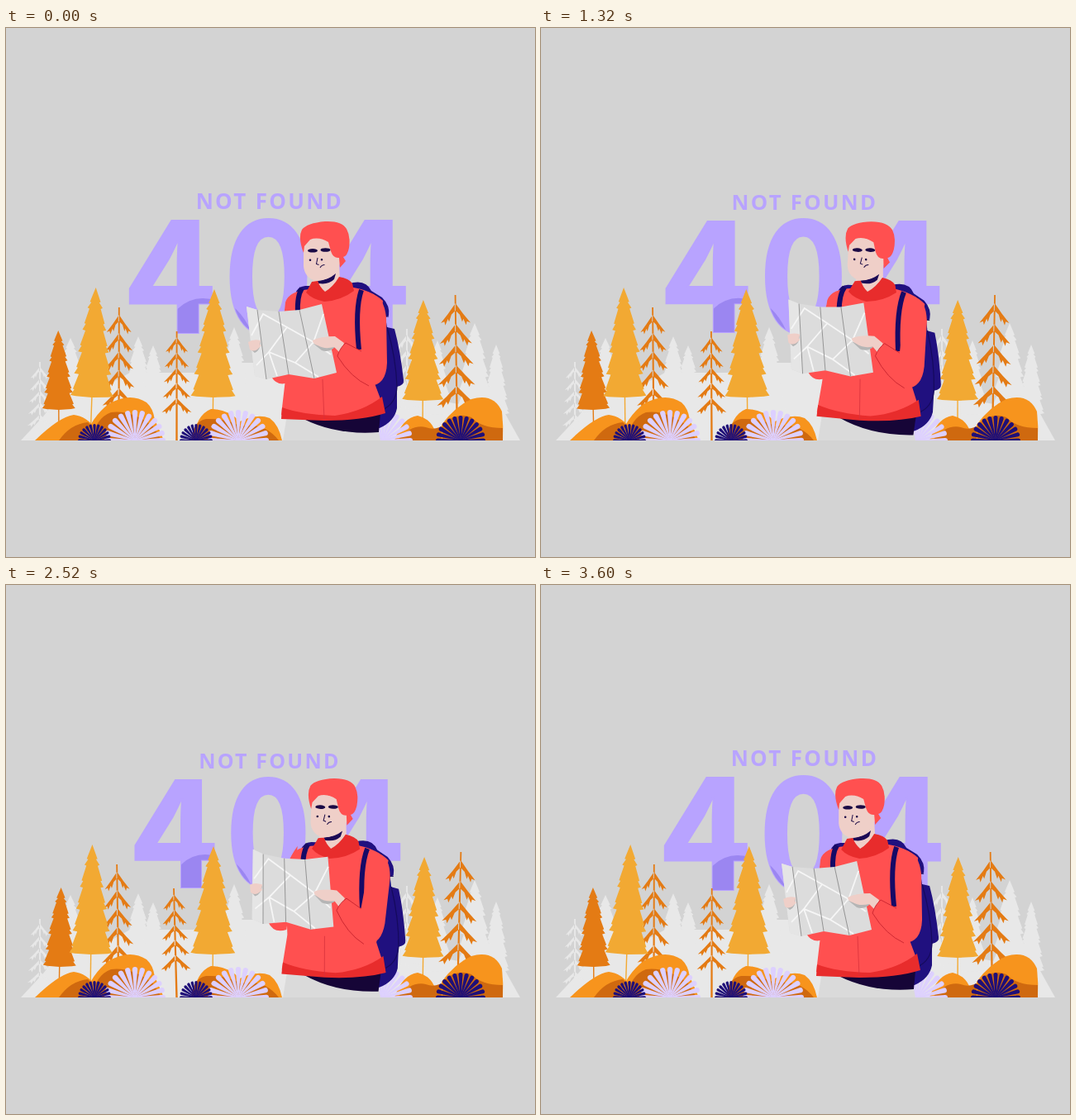
An HTML page that plays this animation: 640x640 px, repeating every 3630 ms.

```html
<!DOCTYPE html>
<html lang="en">
<head>
<meta charset="utf-8">
<title>Not found</title>
<style>
  html, body { margin: 0; width: 100%; height: 100%; overflow: hidden; background: #d3d3d3; }
  svg { display: block; width: 100vw; height: 100vh; }
  text { font-family: "Open Sans", "Noto Sans", sans-serif; font-weight: 700; }
  .digits { font-family: "Noto Sans CJK JP", "Noto Sans CJK SC", "Noto Sans CJK", "Open Sans", sans-serif; font-size: 183px; text-anchor: middle; }
</style>
</head>
<body>
<svg viewBox="0 0 640 640">
  <defs>
    <clipPath id="digits"><text class="digits" x="200 317.5 434" y="369">404</text></clipPath>
  </defs>

  <g id="title" fill="#b8a3ff">
    <text x="229.7" y="219" font-size="26" letter-spacing="2.3">NOT FOUND</text>
    <text class="digits" x="200 317.5 434" y="369" stroke="#b8a3ff" stroke-width="2">404</text>
    <g clip-path="url(#digits)" fill="#9b86f1">
      <circle cx="238" cy="369" r="42"/>
      <path d="M262 330Q286 339 300 375H262Z"/>
    </g>
  </g>

  <g id="backdrop" fill="#e8e8e8">
    <path d="M18 499L45 470L62 448Q105 440 130 428L150 417H260L285 405H340V430H480L520 450L603 465L622 499Z"/>
  </g>
  <g id="trees"></g>

  <g id="hills" fill="#f7941d">
    <path d="M35 499Q65 470 82 468Q98 470 108 485L125 499Z"/>
    <path fill="#cf690f" d="M64 499Q78 479 99 477L122 499Z"/>
    <path d="M94 499Q104 470 124 455Q150 440 170 453Q178 460 180 474L191 499Z"/>
    <path fill="#cf690f" d="M104 499Q108 472 127 465Q152 462 178 482L188 499Z"/>
    <path d="M226 499Q230 468 248 461Q268 461 283 476Q304 466 319 472Q330 480 334 499Z"/>
    <path fill="#cf690f" d="M224 499Q226 476 242 473Q268 472 283 482Q312 476 330 499Z"/>
    <path d="M470 499Q480 471 498 469Q512 472 518 485L540 499Z"/>
    <path fill="#cf690f" d="M474 499Q490 479 508 483Q520 488 533 478L560 499Z"/>
    <path d="M527 480Q543 458 563 449Q590 441 600 464Q602 482 601 499H527Z"/>
    <path fill="#cf690f" d="M528 480Q545 464 563 471Q575 484 601 484V499H528Z"/>
  </g>
  <g id="bushes"></g>

  <path fill="#dadada" d="M340 468L335 499H453L449 478Z"/>
  <g id="body">
    <path fill="#20107f" d="M350 322Q352 313 362 312H405L420 308Q436 305 442 318L455 326Q465 336 463 348L459 350L461 362L470 364Q477 390 481 426Q482 432 473 434V460Q470 476 452 484L360 470Z"/>
    <path fill="none" stroke="#150a5c" stroke-width="1.2" d="M446 322Q456 333 456 349H463M461 362Q472 400 473 434Q472 455 455 462"/>
    <path fill="#160537" d="M360 473Q400 493 451 489L453 466Z"/>
    <path fill="#ff5050" d="M368 316Q342 318 338 332L333 380Q336 400 338 425L333 468Q380 478 420 472Q440 468 458 462L446 430L456 330Q442 317 415 313Z"/>
    <path fill="#e82c2c" d="M334 459Q358 468 398 469Q432 464 455 446L459 466Q430 475 385 475L333 473Z"/>
    <path fill="none" stroke="#d8323c" stroke-width=".8" d="M383 425L385 474"/>
    <path fill="none" stroke="#160a66" stroke-width="6" d="M358 315Q352 324 353 345M430 317Q422 340 427 389"/>

    <path fill="#efcfc8" d="M376 285H403L404 304Q396 314 386 322L371 307Z"/>
    <path fill="#1b0a55" d="M377 306Q390 305 399 297L397 304Q390 311 378 309Z"/>
    <path fill="#e82c2c" d="M363 320L370 307L377 306Q380 314 386 319Q396 313 403 301Q415 303 419 309L421 318Q405 330 385 331Q370 328 363 320Z"/>
    <path fill="#efcfc8" d="M360 258V288Q361 302 375 306Q391 305 398 296L408 278L405 250H370Z"/>
    <path fill="#ff5050" d="M360 272Q353 254 358 244Q364 236 386 234Q406 233 412 243Q417 252 415 266Q413 276 408 277L411 282L404 290L403 278Q396 279 393 270L390 259Q378 252 368 256L361 264Z"/>
    <g fill="#1b0a45">
      <ellipse cx="371" cy="269.300" rx="6" ry="2.300"/>
      <ellipse cx="386.500" cy="268.500" rx="6" ry="2.300"/>
      <circle cx="368" cy="280.8" r="1.3"/>
      <circle cx="382" cy="280.3" r="1.3"/>
      <path fill="none" stroke="#1b0a45" d="M377 278L375.500 285.500L378.500 286.500M380 290Q382 286.500 385.500 286.500"/>
    </g>

    <g id="arms">
      <path fill="#ff5050" d="M344 326Q330 350 321 422Q329 435 344 428Z"/>
      <path fill="#dcdcdc" d="M291 337L304 341L330 343L355 341L382 334L400 417L373 424L342 419L315 425L301 421Z"/>
      <path fill="#e5e5e5" d="M291 337L304 341L315 425L301 421Z"/>
      <path fill="none" stroke="#f6f6f6" stroke-width="1.8" d="M297 372L311 346L340 362L318 392L328 421M340 362L372 380L384 346M318 392L350 405L372 380L393 395M350 405L378 422M303 408L318 392"/>
      <path fill="none" stroke="#959595" d="M304 341L315 425M330 343L342 419M355 341L373 424"/>
      <path fill="#b5b5b5" d="M295 388Q302 386 308 379Q308 390 301 393ZM372 382Q386 384 398 386Q391 393 382 390Z"/>
      <path fill="#efcfc8" d="M293 380Q299 376 308 378L307 383L309 384L304 389Q299 392 295 389ZM371 378Q380 373 398 373L409 381L405 394L397 386Q385 389 377 384Q371 382 371 378Z"/>
      <path fill="#ff5050" d="M433 326Q456 316 460 350L461 405Q460 433 439 433Q417 423 401 397Q404 387 411 381L430 391Z"/>
      <path fill="none" stroke="#c9242f" stroke-width=".9" d="M430 391L411 381Q404 387 401 397Q417 423 439 433"/>
    </g>
  </g>
  <path fill="#d3d3d3" d="M0 499H640V640H0Z"/>
</svg>

<script>
const PERIOD = 3630;
const TAU = 2 * Math.PI;
const DEG = 360 / TAU;
const GROUND = 499;
const AMBER = '#f2a933', RUST = '#e47b14';
const $ = id => document.getElementById(id);
const add = (id, markup) => $(id).insertAdjacentHTML('beforeend', markup);

// Layered conifer outline: right side, then its mirror image.
function fir(x, top, bottom, width, tiers = 5) {
  const side = [[0, top]];
  let inner = 0, upper = top;
  for (let i = 1; i <= tiers; i++) {
    const y = top + (bottom - top) * i / tiers;
    const w = width * (i / tiers) ** 0.65;
    const mid = inner + (w - inner) * 0.6, midY = upper + (y - upper) * 0.65;
    side.push([mid + 1, midY], [mid - 0.8, midY + 0.5], [w, y - 2], [w * 0.75, y - 1]);
    inner = w * 0.75;
    upper = y - 1;
  }
  side.push([0, bottom]);
  const mirror = side.map(([dx, y]) => [-dx, y]).reverse();
  return `<path d="M${[...side, ...mirror].map(([dx, y]) => [x + dx, y]).join('L')}Z"/>`;
}

// Bare stem with pairs of drooping, ragged branches.
function branchy(x, top, bottom, width, rows = 5) {
  const step = (bottom - top) / (rows + 0.4);
  let d = `M${x - 0.9} ${top}h1.8L${x + 1.2} ${GROUND}h-2.4Z`;
  for (let i = 0; i < rows; i++) {
    const y = top + step * (i + 0.4), w = width * (0.75 + 0.25 * i / (rows - 1));
    for (const s of [-w, w]) {
      const p = (fx, fy) => `${x + s * fx} ${y + step * fy}`;
      d += `M${p(0, 0)}L${p(0.5, 0.5)}L${p(1, 0.95)}L${p(0.76, 0.88)}L${p(0.7, 1.06)}` +
           `L${p(0.52, 0.75)}L${p(0.44, 0.9)}L${p(0.28, 0.55)}L${p(0, 0.35)}Z`;
    }
  }
  return `<path d="${d}"/>`;
}

function bush(x, r, color) {
  const w = r * 0.085;
  let rays = '';
  for (let a = -90; a <= 90; a += 15) {
    rays += `<path transform="rotate(${a})" d="M-.4 0L${-w} ${w - r}a${w} ${w} 0 0 1 ${2 * w} 0L.4 0Z"/>`;
  }
  return `<g transform="translate(${x} ${GROUND})" fill="${color}">${rays}</g>`;
}

add('backdrop',
  [[78, 375, 22], [160, 373, 20], [178, 384, 18], [276, 362, 22], [522, 378, 18], [567, 357, 24], [593, 383, 16]]
    .map(([x, top, w]) => fir(x, top, 468, w)).join('') +
  branchy(41, 404, 482, 15) + branchy(485, 364, 462, 18));

// Sway: mean lean and amplitude at the tip in px, peak as part of a cycle.
const trees = [
  { x: 136.5, top: 338, bottom: 458, w: 20, shape: branchy, color: RUST, lean: -1.2, amp: 1.5, peak: 0 },
  { x: 64, top: 366, bottom: 462, w: 20, shape: fir, color: RUST, lean: 0, amp: 3.2, peak: 0.29 },
  { x: 102, top: 314, bottom: 447, w: 26, shape: fir, color: AMBER, lean: 2.75, amp: 5.75, peak: 0.13 },
  { x: 206.5, top: 367, bottom: 466, w: 18, shape: branchy, color: RUST, lean: -1.5, amp: 2, peak: 0.9 },
  { x: 250, top: 316, bottom: 447, w: 27, shape: fir, color: AMBER, lean: 0.6, amp: 2.6, peak: 0.16 },
  { x: 504, top: 329, bottom: 451, w: 25, shape: fir, color: AMBER, lean: 1.2, amp: 1.1, peak: 0.3 },
  { x: 546, top: 323, bottom: 458, w: 24, shape: branchy, color: RUST, lean: 1.7, amp: 4.2, peak: 0.53 }
];
for (const tree of trees) {
  const { x, top, bottom, w, shape, color } = tree;
  const trunk = shape === fir ? `<path d="M${x - 0.7} ${bottom - 5}h1.4V${GROUND}h-1.4Z"/>` : '';
  add('trees', `<g fill="${color}">${trunk}${shape(x, top, bottom, w)}</g>`);
  tree.node = $('trees').lastChild;
}

const LILAC = '#ddd0ff', NAVY = '#1f0f78';
add('bushes', bush(156, 37, LILAC) + bush(281, 37, LILAC) + bush(456, 36, LILAC) +
  bush(107, 20, NAVY) + bush(230, 20, NAVY) + bush(550, 30, NAVY));

// Smooth periodic curve through the given values, without overshoot.
const KEYS = [0, 390, 900, 1320, 2070, 2970];
function track(values) {
  const n = KEYS.length;
  const value = i => values[(i + n) % n];
  const time = i => KEYS[(i + n) % n] + PERIOD * Math.floor(i / n);
  const rise = i => (value(i + 1) - value(i)) / (time(i + 1) - time(i));
  const slope = i => {
    const a = rise(i - 1), b = rise(i);
    return a * b > 0 ? 2 * a * b / (a + b) : 0;
  };
  return t => {
    let i = n - 1;
    while (KEYS[i] > t) i--;
    const span = time(i + 1) - time(i), u = (t - time(i)) / span, v = 1 - u;
    return v * v * (1 + 2 * u) * value(i) + u * u * (3 - 2 * u) * value(i + 1) +
      span * u * v * (v * slope(i) - u * slope(i + 1));
  };
}
const titleScale = track([1, 0.994, 0.982, 0.99, 0.956, 0.971]);
const bodyTilt = track([0, -0.25, 1.75, 3.2, 1.75, 3.3]);
const armLift = track([0, 0.8, 0.4, 1.2, 5.9, 3.4]);

const rotate = (node, angle, x, y) => node.setAttribute('transform', `rotate(${angle} ${x} ${y})`);

function draw(now) {
  const t = now % PERIOD;
  for (const { node, x, top, lean, amp, peak } of trees) {
    const tip = lean + amp * Math.cos(TAU * (2 * t / PERIOD - peak));
    rotate(node, tip / (GROUND - top) * DEG, x, GROUND);
  }
  $('title').setAttribute('transform', `translate(317.5 299) scale(${titleScale(t)}) translate(-317.5 -299)`);
  rotate($('body'), bodyTilt(t), 390, 480);
  rotate($('arms'), armLift(t), 440, 340);
  requestAnimationFrame(() => draw(performance.now() - start));
}
const start = performance.now();
draw(0);
</script>
</body>
</html>
```
